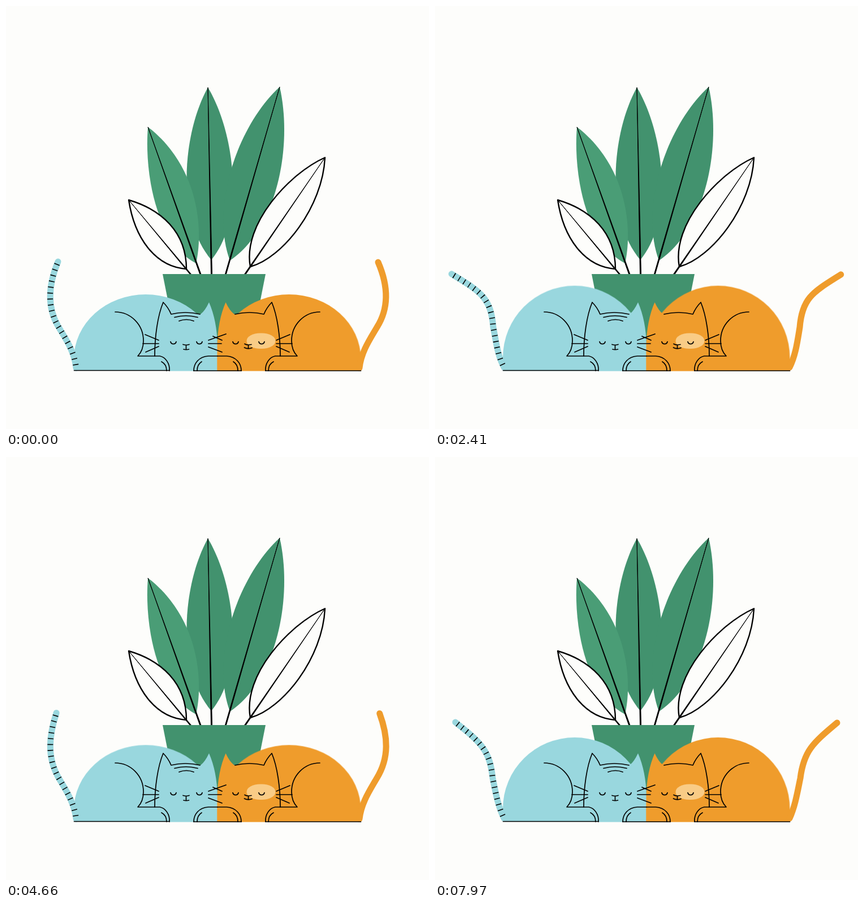
Recreate the animation shown at these times as an HTML page without scripts. Size 748 px wide and 748 px high, loop 8000 ms.

```html
<!DOCTYPE html>
<html lang="en">
<head>
<meta charset="utf-8">
<title>Two sleeping cats</title>
<style>
  html, body { margin: 0; width: 100%; height: 100%; overflow: hidden; background: #fdfdfb; }
  svg { display: block; width: 100vw; height: 100vh; }

  .green { fill: #42926e; }
  .light { fill: #4a9d76; }
  .blue { fill: #99d7de; }
  .orange { fill: #ef9c2c; }
  .line { fill: none; stroke: #000; stroke-width: 1.7; stroke-linecap: round; stroke-linejoin: round; }
  .outline { fill: #fdfdfb; stroke: #000; stroke-width: 2.4; stroke-linejoin: round; }
  .stem { stroke: #000; stroke-width: 1; stroke-linejoin: round; }

  /* breathing bodies */
  .body { transform-origin: 0 645px; animation: breathe 8s infinite; }
  @keyframes breathe {
    0%, 62.5% { transform: scaleY(.9); animation-timing-function: cubic-bezier(.364, 0, .636, 1); }
    31.25% { transform: scaleY(1.003); animation-timing-function: cubic-bezier(.364, 0, .636, 1); }
    93.75% { transform: scaleY(1.003); animation-timing-function: cubic-bezier(.33, 0, .67, .33); }
    100% { transform: scaleY(.993); }
  }

  /* tail poses, from curled in (a) to swung out (e) */
  .left {
    --a: path("M124 640C121 610 105 588 92 566C70 528 77 488 92 452");
    --b: path("M124 640C120 612 106 590 94 567C79 536 74 505 79 454");
    --c: path("M123 640C114 616 106 590 99 568C91 540 78 504 50 463");
    --d: path("M122 639C111 617 107 592 102 568C97 520 83 506 36 469");
    --e: path("M122 639C110 617 108 592 103 568C99 515 80 505 29 474");
  }
  .right {
    --a: path("M625 640C628 612 643 590 656 568C680 530 674 490 658 453");
    --b: path("M625 640C628 612 643 590 655 567C672 536 680 505 670 455");
    --c: path("M626 640C635 616 641 590 648 568C656 540 669 504 697 463");
    --d: path("M627 639C637 617 641 592 646 568C652 520 668 506 711 470");
    --e: path("M627 639C638 617 641 592 645 568C649 515 670 505 718 475");
  }
  .tail {
    d: var(--a);
    fill: none;
    stroke-width: 11;
    stroke-linecap: round;
    animation: swing 8s linear infinite;
  }
  .left { stroke: #99d7de; }
  .right { stroke: #ef9c2c; }
  .stripes { stroke: #000; stroke-width: 10; stroke-linecap: butt; stroke-dasharray: 1.6 8.9; stroke-dashoffset: -5; }
  @keyframes swing {
    0%, 62.5% { d: var(--a); animation-timing-function: cubic-bezier(.33, 0, .67, .33); }
    9%, 71.5% { d: var(--b); animation-timing-function: linear; }
    19%, 81.5% { d: var(--c); animation-timing-function: cubic-bezier(.33, .4, .67, .76); }
    25.375%, 87.875% { d: var(--d); animation-timing-function: cubic-bezier(.33, .67, .67, 1); }
    31.25%, 93.75% { d: var(--e); animation-timing-function: cubic-bezier(.33, 0, .67, .33); }
    37.125% { d: var(--d); animation-timing-function: cubic-bezier(.33, .24, .67, .6); }
    43.5% { d: var(--c); animation-timing-function: linear; }
    53.5% { d: var(--b); animation-timing-function: cubic-bezier(.33, .67, .67, 1); }
    99.625%, 100% { d: var(--d); }
  }
</style>
</head>
<body>
<svg viewBox="0 0 748 748">
  <defs>
    <path id="body" d="M120 645V622A127 127 0 0 1 374 622V645Z"/>
    <path id="head" d="M292 545Q317 539 344 545Q352 539 359 524Q373 556 374 600V645.500H289V600Z"/>
    <g id="lines">
      <path d="M193 541C220 541 243 563 243 592C243 603 240 612 233 619H272C282 621 290 632 289 645"/>
      <path d="M275 629C281 632 284 638 284 645"/>
      <path d="M263 619C263 585 268 548 278 524Q287 533 292 545Q317 539 343 545"/>
      <path d="M332 645C332 632 341 620 358 619H374M338 645C338 638 341 632 346 629"/>
      <path d="M291 593.500C292 599 300 599 301 593.500M337 593.500C338 599 346 599 347 593.500"/>
      <path d="M246 581L270 591M242 597H270M247 612L270 602"/>
    </g>
  </defs>

  <!-- plant -->
  <path class="green" d="M357 144C312 225 300 375 363 449C425 375 403 220 357 144Z"/>
  <path class="green" d="M484 143C406 215 362 360 396 450C478 395 508 250 484 143Z"/>
  <path class="light" d="M251 214C244 300 268 420 336 455C349 400 343 285 251 214Z"/>
  <path class="outline" d="M217 343C227 409 263 461 319 465C319 400 275 360 217 343Z"/>
  <path class="outline" d="M564 268C501 296 418 386 432 461C490 445 560 355 564 268Z"/>
  <g class="stem">
    <path d="M357 144L362.500 475H364.500Z"/>
    <path d="M484 143L387.200 475H389.200Z"/>
    <path d="M251 214L343 475H345.200Z"/>
    <path d="M217 343L325.800 475H328.200Z"/>
    <path d="M564 268L421 475H423.600Z"/>
  </g>
  <path class="green" d="M277 474H459L430 620H306Z"/>

  <!-- cats -->
  <g class="blue">
    <use class="body" href="#body"/>
    <use href="#head"/>
  </g>
  <g class="orange" transform="matrix(-1 0 0 1 747.5 0)">
    <use class="body" href="#body"/>
    <use href="#head"/>
  </g>
  <path class="tail left"/>
  <path class="tail left stripes" pathLength="200"/>
  <path class="tail right"/>
  <rect x="425.500" y="578.500" width="51" height="27.500" rx="24" ry="13.500" fill="#f9cc86"/>

  <g class="line">
    <use href="#lines"/>
    <use href="#lines" transform="matrix(-1 0 0 1 748 0)"/>
    <path d="M298 550.500Q318 545 339 550.500M306 557Q319 552 332 557"/>
    <path d="M313 598.500Q318.500 600.500 324 598.500M318.500 599.500V607M314 607Q318.500 608.500 323.500 607"/>
    <path d="M422 597.500Q427 600.500 434 598.500M428.500 599.500V605.500M421.500 604Q428 607.500 435 604.500"/>
    <path d="M358 591L389 580M366 584L382 591M358 597H381M358 603L382 612"/>
    <path d="M120.500 644.500H289M332 645H416M459 645H627.500"/>
  </g>
</svg>
</body>
</html>
```
